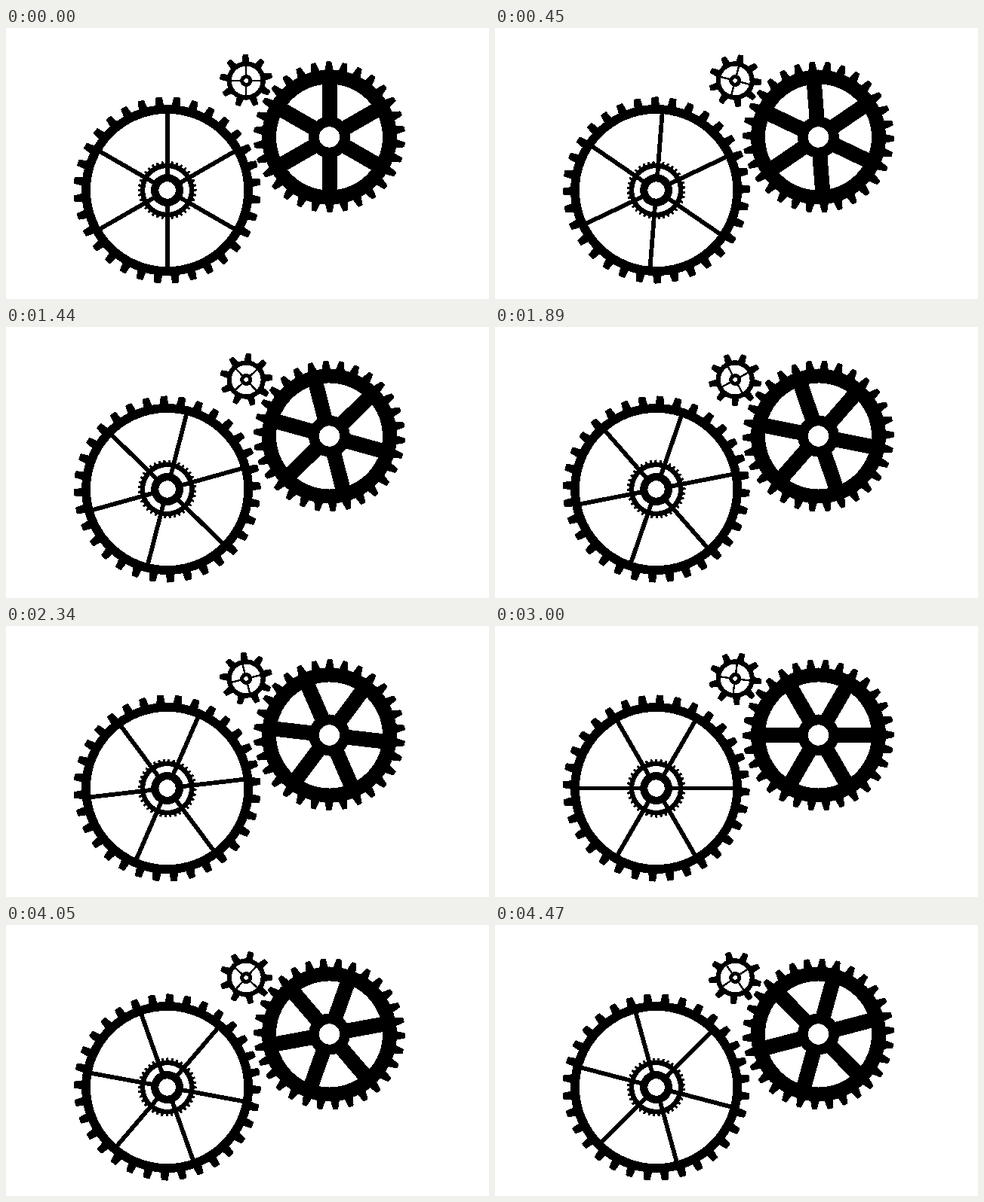
Write an HTML page that moves like this. It is 640x360 px and loops after 4500 ms.

```html
<!DOCTYPE html>
<html lang="en">
<head>
<meta charset="utf-8">
<title>Turning gears</title>
<style>
  html, body { margin: 0; width: 100%; height: 100%; overflow: hidden; background: #fff; }
  svg { display: block; width: 100vw; height: 100vh; }
</style>
</head>
<body>
<svg id="stage" viewBox="0 0 640 360" shape-rendering="crispEdges"></svg>
<script>
const LOOP = 4500, STEP = 30;
const stage = document.getElementById('stage');

function add(parent, tag, attrs) {
  const el = document.createElementNS('http://www.w3.org/2000/svg', tag);
  for (const key in attrs) el.setAttribute(key, attrs[key]);
  parent.appendChild(el);
  return el;
}

// Circle outline as a subpath, so evenodd filling can cut holes
const circle = r => `M${-r} 0a${r} ${r} 0 1 1 ${2 * r} 0a${r} ${r} 0 1 1 ${-2 * r} 0Z`;

function ring(g, outer, inner) {
  add(g, 'path', { d: circle(outer) + circle(inner), 'fill-rule': 'evenodd' });
}

// Tapered teeth with slightly cut corners
function teeth(g, { count, root, tip, base, top, shift = 0, cut = 1 }) {
  const b = base / 2, t = top / 2, r = root - 2;
  const d = `M${-b} ${-r}L${-t} ${-tip + cut}L${-t + cut} ${-tip}` +
            `H${t - cut}L${t} ${-tip + cut}L${b} ${-r}Z`;
  for (let i = 0; i < count; i++) {
    add(g, 'path', { d, transform: `rotate(${shift + i * 360 / count})` });
  }
}

function spokes(g, count, width, from, to) {
  for (let i = 0; i < count; i++) {
    add(g, 'rect', {
      x: -width / 2, y: -to, width, height: to - from,
      transform: `rotate(${i * 360 / count})`
    });
  }
}

function gear(x, y, speed, draw) {
  const g = add(stage, 'g', { fill: '#000' });
  draw(g);
  return { g, x, y, speed };
}

// Speeds are in degrees per second
const gears = [
  gear(213.6, 215.5, 10, g => {
    teeth(g, { count: 32, root: 113, tip: 124, base: 12, top: 9, shift: -5.2 });
    ring(g, 113.5, 101.7);
    spokes(g, 6, 5.8, 16, 104);
    teeth(g, { count: 36, root: 35, tip: 39, base: 4.2, top: 2.8, cut: 0.5 });
    ring(g, 36, 29.4);
    ring(g, 21.5, 11.2);
  }),
  gear(428.5, 145, -10, g => {
    teeth(g, { count: 30, root: 89, tip: 100.5, base: 12.5, top: 7, shift: -0.3 });
    ring(g, 89.5, 70.5);
    spokes(g, 6, 20, 18, 73);
    ring(g, 27.5, 13.7);
  }),
  gear(318.2, 70, 32.5, g => {
    teeth(g, { count: 9, root: 25, tip: 35, base: 10, top: 7.4, shift: -1.5 });
    ring(g, 25.7, 19.4);
    spokes(g, 4, 2.4, 5, 21);
    ring(g, 8, 2.8);
  })
];

function render(ms) {
  const t = Math.floor((ms % LOOP) / STEP) * STEP / 1000;
  for (const { g, x, y, speed } of gears) {
    g.setAttribute('transform', `translate(${x} ${y}) rotate(${speed * t})`);
  }
}

const start = performance.now();
function tick() {
  render(performance.now() - start);
  requestAnimationFrame(tick);
}
tick();
</script>
</body>
</html>
```
